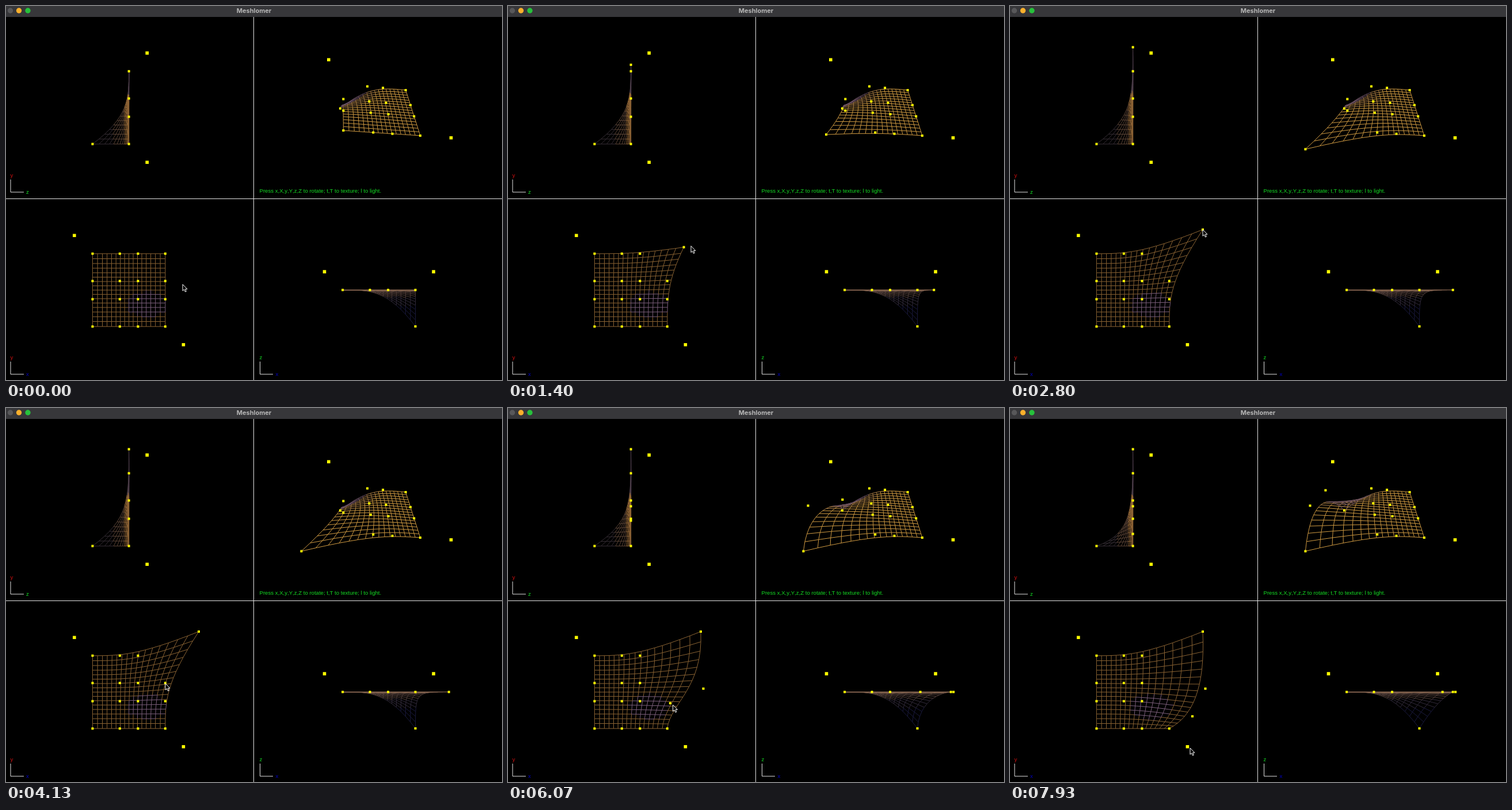
Recreate the animation shown at these times as an HTML page. Size 862 px wide and 649 px high, loop 8000 ms.

```html
<!DOCTYPE html>
<html lang="en">
<head>
<meta charset="utf-8">
<title>Meshlomer</title>
<style>
  html, body { margin: 0; width: 100%; height: 100%; overflow: hidden; background: #000; }
  svg { display: block; width: 862px; height: 649px; }
  text { font: 9.6px "Liberation Sans", Arial, sans-serif; font-kerning: none; }
  .title { font: 700 11px Inter, "Open Sans", sans-serif; fill: #b6b6b6; text-anchor: middle; }
  .axis, .divider { fill: none; stroke: #e4e4e4; stroke-width: 1; }
  .mesh { fill: none; stroke-width: 1; }
  .marks { fill: #ff0; }
</style>
</head>
<body>
<svg viewBox="0 0 862 649">
  <rect width="862" height="649"/>
  <rect width="862" height="19" fill="#37373a"/>
  <circle cx="7.5" cy="8" r="4.7" fill="#58585a"/>
  <circle cx="22.5" cy="8" r="4.7" fill="#fbb02c"/>
  <circle cx="38" cy="8" r="4.7" fill="#27c13c"/>
  <text class="title" x="431" y="12">Meshlomer</text>
  <path class="divider" d="M430.5 19V649M0 334.5H862"/>
  <path class="axis" d="M8 301V323H31M8 617V639H31M441.5 617V639H464"/>
  <g fill="#d01010"><text x="7.5" y="297">y</text><text x="7.5" y="613">y</text></g>
  <g fill="#14dc24">
    <text x="35" y="325.5">z</text>
    <text x="440.5" y="613">z</text>
    <text x="440.5" y="324">Press x,X,y,Y,z,Z to rotate; t,T to texture; l to light.</text>
  </g>
  <g fill="#0000c0"><text x="35" y="641.5">x</text><text x="468.5" y="641.5">x</text></g>
  <g id="views"></g>
  <path id="cursor" d="M0 0V11.2L2.6 8.9L4.4 13L6.3 12.2L4.5 8.2H7.9Z" fill="#000" stroke="#fff"/>
</svg>
<script>
const LOOP = 8000, STEP = 1000 / 15, CELLS = 16, UNIT = 31.6;
const FRONT = { x: 213.6, y: 493 };
const KNOTS = [-2, -0.5, 0.5, 2];
const LIGHTS = [[3, -3, 1], [-3, 3, 1]];

// Pointer legs: start, end, x, y; it rests between legs
const HOME = [307, 483];
const LEGS = [
  [100, 750, 277, 430],
  [930, 1333, 305.5, 418.5],
  [1333, 1700, 374, 407],
  [1700, 2203, 360.5, 407],
  [2203, 2733, 335, 388],
  [2930, 3900, 277, 478],
  [4266, 4660, 332, 485],
  [4733, 4930, 339.5, 487],
  [5130, 5700, 277, 509],
  [5930, 6500, 317, 535],
  [6930, 7930, 313, 590]
];

// Grab and release times for the right edge, top row first
const DRAGS = [[930, 2800], [4266, 5100], [5930, 6900]];

const ortho = (cx, cy, h, v) => p => [cx + UNIT * p[h], cy - UNIT * p[v]];

function perspective([x, y, z]) {
  const w = 1 - 0.0125 * x - 0.0535 * y - 0.0413 * z;
  return [647.6 + (-29.9 * x + 3.29 * y + 5.65 * z) / w,
          176.4 + (-2.55 * x + 19.75 * y - 23.1 * z) / w];
}

const views = [
  {
    project: ortho(213.6, 176.4, 2, 1),
    colors: ['#4b3d48', '#8f6436', '#5b4436', '#352d34'],
    shade: ([x, y, z]) => z < -0.9 ? 3 : z < -0.25 ? 2 : y > 0.8 ? 0 : 1
  },
  {
    project: perspective,
    colors: ['#cf9a42', '#a87c44', '#6a5062'],
    shade: ([x, y, z]) => z < -0.55 ? 2 : z < -0.2 ? 1 : 0
  },
  {
    project: ortho(FRONT.x, FRONT.y, 0, 1),
    colors: ['#8a6333', '#7d607c'],
    shade: ([x, y]) => Math.hypot((x - 1) / 1.1, (y + 0.8) / 0.7) < 1 ? 1 : 0
  },
  {
    project: ortho(648.3, 492.7, 0, 2),
    colors: ['#7d5e4b', '#523f3a', '#312a3a', '#1a1a3e'],
    shade: ([x, y, z]) => z < -0.95 ? 3 : z < -0.4 ? 2 : z < -0.08 ? 1 : 0
  }
];

const root = document.getElementById('views');
const cursor = document.getElementById('cursor');

function addPath(cls, stroke = 'none') {
  const el = document.createElementNS('http://www.w3.org/2000/svg', 'path');
  el.setAttribute('class', cls);
  el.setAttribute('stroke', stroke);
  return root.appendChild(el);
}

for (const v of views) {
  v.lines = v.colors.map(c => addPath('mesh', c));
  v.marks = addPath('marks');
}

const bernstein = Array.from({ length: CELLS + 1 }, (_, k) => {
  const t = k / CELLS, s = 1 - t;
  return [s * s * s, 3 * s * s * t, 3 * s * t * t, t * t * t];
});

function pointer(t) {
  let [x, y] = HOME;
  for (const [from, to, tx, ty] of LEGS) {
    const f = Math.min(1, Math.max(0, (t - from) / (to - from)));
    x += (tx - x) * f;
    y += (ty - y) * f;
  }
  return [x, y];
}

// The dragged point trails the pointer by one step
function controls(t) {
  const net = KNOTS.map(x => KNOTS.map(y => [x, y, 0]));
  net[3][0][2] = -2;
  const late = t - STEP;
  DRAGS.forEach(([grab, release], n) => {
    if (late <= grab) return;
    const [px, py] = pointer(Math.min(late, release));
    net[3][3 - n] = [(px - FRONT.x) / UNIT, (FRONT.y - py) / UNIT, 0];
  });
  return net;
}

function surface(net) {
  return bernstein.map(bu => bernstein.map(bv => {
    const p = [0, 0, 0];
    for (let i = 0; i < 4; i++)
      for (let j = 0; j < 4; j++)
        for (let c = 0; c < 3; c++) p[c] += bu[i] * bv[j] * net[i][j][c];
    return p;
  }));
}

const fmt = p => p[0].toFixed(1) + ' ' + p[1].toFixed(1);
const square = (p, size) =>
  `M${fmt(p.map(c => c - size / 2))}h${size}v${size}h${-size}z`;

function drawView(v, net, grid) {
  const flat = grid.map(col => col.map(v.project));
  const d = v.colors.map(() => '');
  const segment = (i, j, k, l) => {
    const mid = grid[i][j].map((c, n) => (c + grid[k][l][n]) / 2);
    d[v.shade(mid)] += `M${fmt(flat[i][j])}L${fmt(flat[k][l])}`;
  };
  for (let i = 0; i <= CELLS; i++)
    for (let j = 0; j < CELLS; j++) {
      segment(i, j, i, j + 1);
      segment(j, i, j + 1, i);
    }
  v.lines.forEach((el, n) => el.setAttribute('d', d[n]));
  v.marks.setAttribute('d',
    net.flat().map(p => square(v.project(p), 4)).join('') +
    LIGHTS.map(p => square(v.project(p), 5.6)).join(''));
}

function render(time) {
  const t = Math.floor((time % LOOP) / STEP + 0.07) * STEP;
  const net = controls(t), grid = surface(net);
  for (const v of views) drawView(v, net, grid);
  cursor.setAttribute('transform', `translate(${fmt(pointer(t))})`);
}

const start = performance.now();
function tick() {
  render(performance.now() - start);
  requestAnimationFrame(tick);
}
tick();
</script>
</body>
</html>
```
